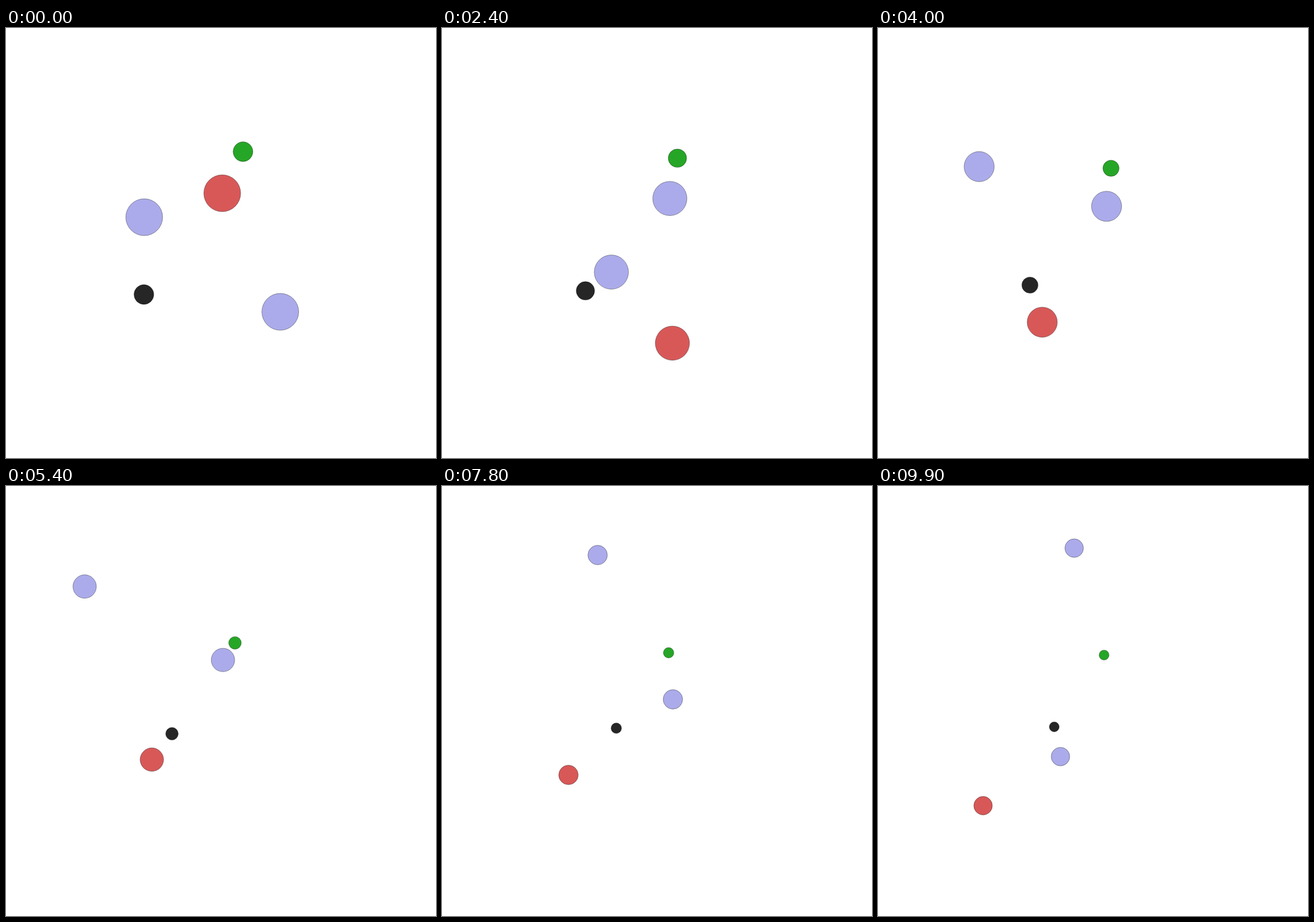
Write an HTML page that moves like this. It is 700 px wide and 700 px high and loops after 10 s.

```html
<!DOCTYPE html>
<html lang="en">
<head>
<meta charset="utf-8">
<title>Wandering discs</title>
<style>
  html, body { margin: 0; width: 100%; height: 100%; overflow: hidden; background: #fff; }
  svg { display: block; width: 100vw; height: 100vh; }
  circle { stroke: #000; stroke-opacity: .5; stroke-width: .7; }
</style>
</head>
<body>
<svg viewBox="0 0 700 700"></svg>
<script>
const STEP = 100, STEPS = 100, HALF = 350, MARGIN = 201.3, JITTER = 4;
const WANDERER = 30, ANCHOR = 16.1;
const BLUE = 'rgba(88,88,216,.5)';

// Steps at which every wanderer passes one of its waypoints.
const stops = [0, 15, 24, 33, 40, 54, 70, 78, 99];

// Waypoints are measured from the stage centre; a single one stays put.
const discs = [
  { r: WANDERER, fill: 'rgb(216,88,88)', way: [
    [2, -81], [30, 50], [27, 175.6], [-45, 192], [-101, 157.6],
    [-177, 150], [-243, 258], [-273, 228], [-356, 339]] },
  { r: WANDERER, fill: BLUE, way: [
    [-125, -42], [-93, 52], [-80, 51], [-127, -58], [-226.5, -152],
    [-349, -293], [-263, -461.6], [-183, -450], [-61, -495]] },
  { r: WANDERER, fill: BLUE, way: [
    [96.5, 112], [17, 21], [22.5, -78], [70, -80], [27, -73],
    [5, -105], [68, -45], [49, -5], [-105.4, 180]] },
  { r: ANCHOR, fill: 'rgb(38,166,38)', way: [[35.8, -148.7]] },
  { r: ANCHOR, fill: 'rgb(38,38,38)', way: [[-125.5, 83.8]] }
];

function noise(seed) {
  const n = Math.sin(seed * 127.1) * 43758.5453;
  return (n - Math.floor(n)) * 2 - 1;
}

// The drift from waypoint to waypoint, without the random shaking.
function drift(way, step) {
  if (way.length === 1) return way[0];
  const i = Math.max(1, stops.findIndex(stop => stop >= step));
  const k = (step - stops[i - 1]) / (stops[i] - stops[i - 1]);
  return way[i].map((to, axis) => way[i - 1][axis] + (to - way[i - 1][axis]) * k);
}

function position(disc, step, index) {
  const calm = disc.way.length === 1 || stops.includes(step);
  return drift(disc.way, step).map((v, axis) =>
    calm ? v : v + JITTER * noise(step * 10 + index * 2 + axis));
}

// The view only ever widens: it keeps a margin around the farthest reach so far.
let reach = 0;
const scales = Array.from({ length: STEPS }, (_, step) => {
  reach = Math.max(reach, ...discs.flatMap(disc => drift(disc.way, step)).map(Math.abs));
  return HALF / (reach + MARGIN);
});

const svg = document.querySelector('svg');
for (const disc of discs) {
  disc.node = document.createElementNS('http://www.w3.org/2000/svg', 'circle');
  disc.node.setAttribute('fill', disc.fill);
  svg.append(disc.node);
}

function draw(time) {
  const step = Math.floor(time / STEP) % STEPS;
  const scale = scales[step];
  discs.forEach((disc, index) => {
    const [x, y] = position(disc, step, index);
    disc.node.setAttribute('cx', HALF + x * scale);
    disc.node.setAttribute('cy', HALF + y * scale);
    disc.node.setAttribute('r', disc.r * scale);
  });
}

const start = performance.now();
function tick() {
  draw(performance.now() - start);
  requestAnimationFrame(tick);
}
tick();
</script>
</body>
</html>
```
